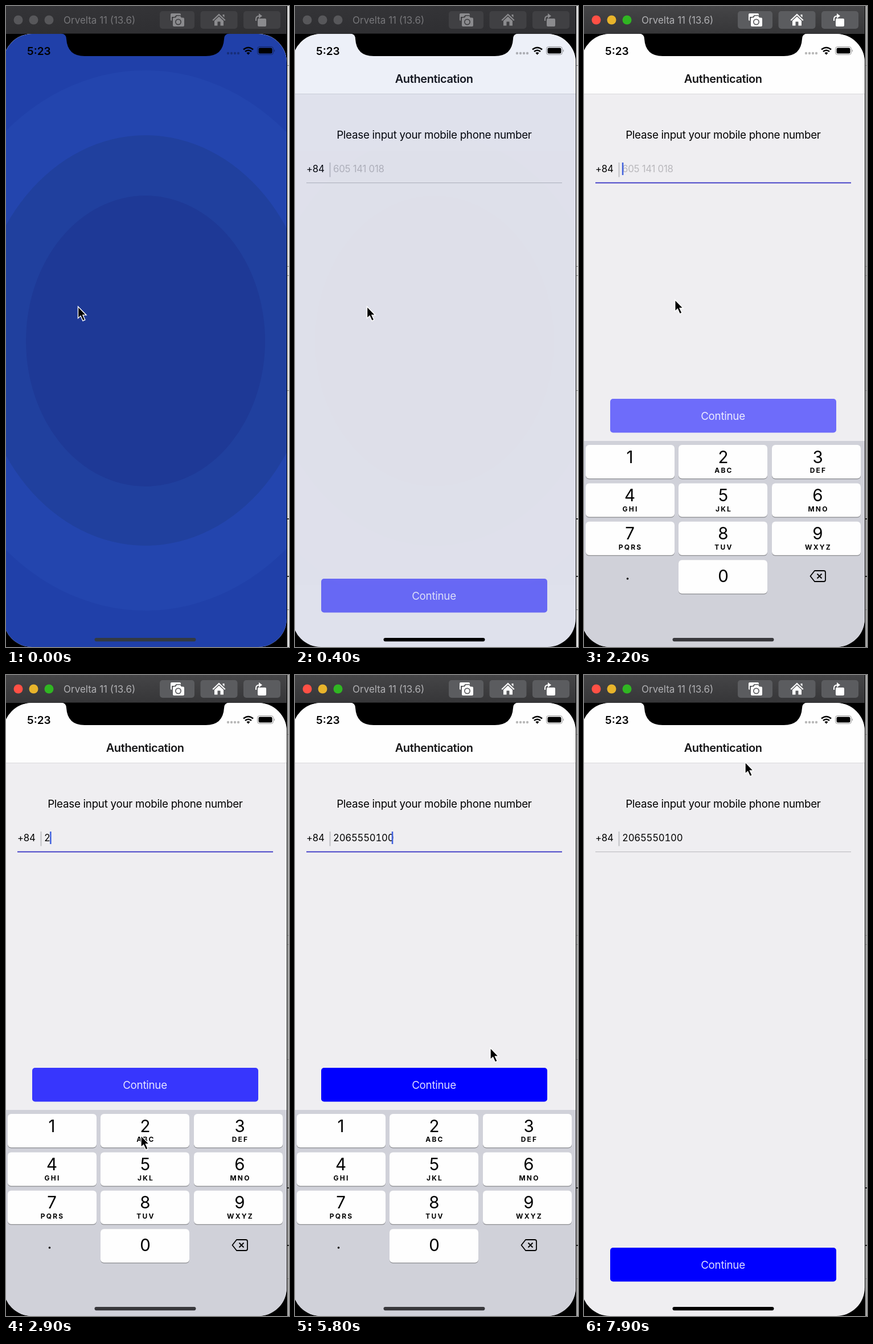
An HTML page that plays this animation: 497 px wide and 1126 px high, repeating every 8 s.

```html
<!DOCTYPE html>
<html lang="en">
<head>
<meta charset="utf-8">
<title>Authentication</title>
<style>
html, body { margin: 0; width: 100%; height: 100%; overflow: hidden; background: #000; }
svg { display: block; width: 497px; height: 1126px; font-family: Inter, Roboto, sans-serif;
  --bar1: #343437; --bar2: #2f2f32; --btn: #404043; --icon: #8b8b8e; --label: #77777a; --edge: #dedede; }
svg.active { --bar1: #454547; --bar2: #363638; --btn: #5b5c5f; --icon: #fff; --label: #b1b1b4; --edge: #a6a6a6; }
.mid { text-anchor: middle; }
.body { font-size: 18.8px; letter-spacing: -.28px; }
.field { font-size: 16.8px; letter-spacing: -.25px; }
.icon { fill: var(--icon); }
.cut { fill: var(--btn); }
.light { fill: #57575a; }
.active .light:nth-of-type(1) { fill: #ff5045; }
.active .light:nth-of-type(2) { fill: #e8b42b; }
.active .light:nth-of-type(3) { fill: #30b622; }
</style>
</head>
<body>
<svg id="stage" viewBox="0 0 497 1126">
  <defs>
    <linearGradient id="bar" x2="0" y2="1">
      <stop style="stop-color:var(--bar1)"/><stop offset="1" style="stop-color:var(--bar2)"/>
    </linearGradient>
    <clipPath id="screen"><rect x="-4.5" y="49" width="497.5" height="1077" rx="50"/></clipPath>
  </defs>

  <rect width="497" height="1126"/>
  <rect x="494" width="3" height="1126" style="fill:var(--edge)"/>
  <path d="M494 104.500h3m-3 353h3m-3 16h3m-3 202h3m-3 385h3" stroke="#888"/>
  <path d="M494 901h3m-3 101h3" stroke="#000" stroke-width="1.500"/>

  <rect width="493" height="49" fill="url(#bar)"/>
  <g>
    <circle class="light" cx="21.500" cy="24.500" r="8"/>
    <circle class="light" cx="48.500" cy="24.500" r="8"/>
    <circle class="light" cx="75.500" cy="24.500" r="8"/>
  </g>
  <text x="101" y="31" font-size="17" style="fill:var(--label)">Orvelta 11 (13.6)</text>
  <g class="cut">
    <rect x="270" y="9" width="61" height="31" rx="5"/>
    <rect x="341.500" y="9" width="65" height="31" rx="5"/>
    <rect x="417" y="9" width="65" height="31" rx="5"/>
  </g>
  <g class="icon">
    <rect x="289" y="13" width="18" height="13" rx="2"/>
    <path class="cut" d="M291 19h5l3-3h7l3 3h5v18h-23z"/>
    <path d="M295 20.500h3l2-3h6l2 3h3q2 0 2 2V34q0 2-2 2h-16q-2 0-2-2V22.500q0-2 2-2z"/>
    <circle class="cut" cx="302.500" cy="28" r="5.500"/><circle cx="302.500" cy="28" r="3.800"/>
    <path d="M374 13.500l11.500 11-1.500 1.500-10-9.500-10 9.500-1.500-1.500zM380.500 15h3v5l-3-3z"/>
    <path d="M374 18.500l8 7.500v8.500h-5.500v-7h-5v7H366V26z"/>
    <rect x="442" y="22" width="15" height="14" rx="2"/>
    <path d="M439 26v-3q0-5.500 6-5.500" fill="none" style="stroke:var(--icon)" stroke-width="2"/>
    <path d="M444 13l6 4.500-6 4.500z"/>
  </g>

  <g clip-path="url(#screen)">
    <rect y="49" width="493" height="1077" fill="#efeef1"/>
    <rect y="49" width="493" height="105" fill="#fefefe"/>
    <path d="M0 154.500h493" stroke="#d9d9dc"/>
    <text class="mid" x="244.200" y="135" font-size="20" font-weight="600" letter-spacing="-.4" fill="#151517">Authentication</text>
    <text class="mid body" x="244.400" y="233">Please input your mobile phone number</text>
    <text class="field" x="20" y="292">+84</text>
    <path d="M61.500 275v25.500" stroke="#c1c1c5" stroke-width="2"/>
    <text class="field" id="hint" x="67" y="292" fill="#b9b8bc">605 141 018</text>
    <text class="field" id="number" x="67" y="292" style="font-variant-numeric:tabular-nums"></text>
    <rect id="caret" y="275" width="2.500" height="22" fill="#4061dd"/>
    <rect id="line" x="20"/>
    <g id="button">
      <rect x="46" y="1006" width="397" height="59.500" rx="5"/>
      <text class="mid body" x="244" y="1042.500" fill="#fff" fill-opacity=".87">Continue</text>
    </g>
    <g id="keyboard"><rect y="764" width="493" height="364" fill="#d0d1d9"/></g>
    <g id="splash">
      <rect y="49" width="493" height="1077" fill="#2040a9"/>
      <ellipse cx="245" cy="587.500" rx="389" ry="474.500" fill="#2345ae"/>
      <ellipse cx="245" cy="587.500" rx="296" ry="360.500" fill="#20409e"/>
      <ellipse cx="245" cy="588.500" rx="210" ry="255.500" fill="#1e3996"/>
    </g>
    <rect id="home" x="155.500" y="1110" width="178" height="6.200" rx="3.100"/>
    <text x="37" y="85.500" font-size="19" font-weight="600">5:23</text>
    <g opacity=".27"><circle cx="390" cy="83" r="2.200"/><circle cx="396" cy="83" r="2.200"/><circle cx="402" cy="83" r="2.200"/><circle cx="408" cy="83" r="2.200"/></g>
    <path d="M417 76.500q8.500-7 17 0M420 80q5.500-4.500 11 0" fill="none" stroke="#000" stroke-width="2.600"/>
    <path d="M422.500 82.500q3-2.300 6 0l-3 3.200z"/>
    <rect x="441.500" y="71.500" width="28" height="14" rx="4" fill="none" stroke="#000" stroke-opacity=".4"/>
    <rect x="443.500" y="73.500" width="24" height="10" rx="2.500"/>
    <path d="M471 76q2 2.500 0 5z" opacity=".5"/>
  </g>
  <path d="M97 48.500q9 .5 9 9.500 2 30 32 30h213q30 0 32-30 0-9 9-9.500z"/>
  <path id="cursor" d="M0 0v20.500l4.600-4.200 3.900 8.700 3.800-1.700-3.900-8.400H14.500z" stroke="#fff" stroke-width="1.400"/>
</svg>
<script>
const $ = id => document.getElementById(id);
const LOOP = 8000, STEP = 100, FOCUS = 1700, BLUR = 7000;
const NUMBER = "2065550100";
const letters = ["", "ABC", "DEF", "GHI", "JKL", "MNO", "PQRS", "TUV", "WXYZ"];

// Key presses: time and key label
const presses = [[2800, 2], [3300, 5], [3700, 6]];
for (let i = 0; i < 7; i++) presses.push([4100 + i * 200, 3]);

// Pointer stops: time, x, y
const stops = [
  [0, 126.5, 528], [800, 126.5, 528], [1300, 106, 292], [1600, 106, 292], [1800, 104.5, 307],
  [2700, 237, 808], [2900, 237, 809], [3250, 246, 862], [3400, 246, 862], [3650, 402, 862],
  [3750, 402, 862], [4000, 405.5, 794], [5400, 405.5, 794], [5800, 343, 655], [6500, 296, 470],
  [7000, 290, 440], [7700, 283, 153], [8000, 283, 153]
];

function add(parent, tag, attrs, text = "") {
  const el = document.createElementNS("http://www.w3.org/2000/svg", tag);
  set(el, attrs);
  el.textContent = text;
  return parent.appendChild(el);
}
function set(el, attrs) {
  for (const k in attrs) el.setAttribute(k, attrs[k]);
}

const keys = {};
function addKey(label, col, row, sub) {
  const x = [3, 166, 330][col], y = 771 + row * 67.4, cx = [80.5, 244.5, 410.5][col];
  const kb = $("keyboard"), box = { x, width: 156, height: 59, rx: 6 };
  add(kb, "rect", { ...box, y: y + 1.3, fill: "#898a8e" });
  keys[label] = add(kb, "rect", { ...box, y });
  add(kb, "text", { class: "mid", x: cx, y: y + (row < 3 ? 31.500 : 39), "font-size": 29.5 }, label);
  add(kb, "text", { class: "mid", x: cx + 1, y: y + 49.3, "font-size": 12, "font-weight": 700, "letter-spacing": 2.2 }, sub);
}
letters.forEach((sub, i) => addKey(i + 1, i % 3, Math.floor(i / 3), sub));
addKey(0, 1, 3, "");
add($("keyboard"), "circle", { cx: 76.5, cy: 1006, r: 1.8 });
add($("keyboard"), "path", {
  d: "M405 992h16q3 0 3 3v13q0 3-3 3h-16l-7.500-9.500zM409.500 997.500l8 8m0-8l-8 8",
  fill: "none", stroke: "#000", "stroke-width": 1.8, "stroke-linejoin": "round"
});

const clamp = v => Math.min(1, Math.max(0, v));
const smooth = v => v * v * (3 - 2 * v);
const easeOut = (v, power) => 1 - (1 - clamp(v)) ** power;

function pointer(t) {
  const i = stops.findIndex(s => s[0] > t);
  const [t0, x0, y0] = stops[i - 1], [t1, x1, y1] = stops[i];
  const k = smooth((t - t0) / (t1 - t0));
  return `translate(${x0 + (x1 - x0) * k} ${y0 + (y1 - y0) * k})`;
}

function draw(t) {
  const focused = t >= FOCUS && t < BLUR;
  const done = presses.filter(p => p[0] <= t);
  const count = done.length;
  const rise = power => easeOut((t - FOCUS) / 400, power) - easeOut((t - BLUR) / 400, power);
  const up = rise(1.66);

  $("stage").classList.toggle("active", t >= 1400);
  set($("splash"), { opacity: (1 - clamp(t / 500)) ** 1.6 });
  set($("home"), { fill: t < 200 ? "#333a42" : up > 0.05 ? "#38383c" : "#000" });
  set($("keyboard"), { transform: `translate(0 ${362 * (1 - up)})` });

  const enabled = clamp((t - presses[0][0]) / 200);
  set($("button"), { transform: `translate(0 ${-316 * rise(1.487)})` });
  set($("button").firstElementChild, {
    fill: `rgb(${110 * (1 - enabled)} ${108 * (1 - enabled)} ${250 + 5 * enabled})`
  });

  $("number").textContent = NUMBER.slice(0, count);
  set($("hint"), { opacity: count ? 0 : 1 });
  const last = count ? done[count - 1][0] : FOCUS;
  set($("caret"), { x: 66.8 + 10.3 * count, opacity: focused && (t - last) % 1000 < 600 ? 1 : 0 });

  const stretch = 12 * Math.sin(Math.PI * clamp((t - FOCUS) / 200));
  set($("line"), {
    y: focused ? 309.7 : 310, width: 449 + stretch,
    height: focused ? 1.8 : 1.2, fill: focused ? "#3632c4" : "#bfbec3"
  });

  for (const k in keys) {
    const down = count && t - last < STEP && done[count - 1][1] == k;
    set(keys[k], { fill: down ? "#b6b9c3" : "#fefefe" });
  }
  set($("cursor"), { transform: pointer(t) });
}

const start = performance.now();
function tick(now) {
  const t = Math.max(0, now - start) % LOOP;
  draw(Math.floor(t / STEP) * STEP);
  requestAnimationFrame(tick);
}
draw(0);
requestAnimationFrame(tick);
</script>
</body>
</html>
```
